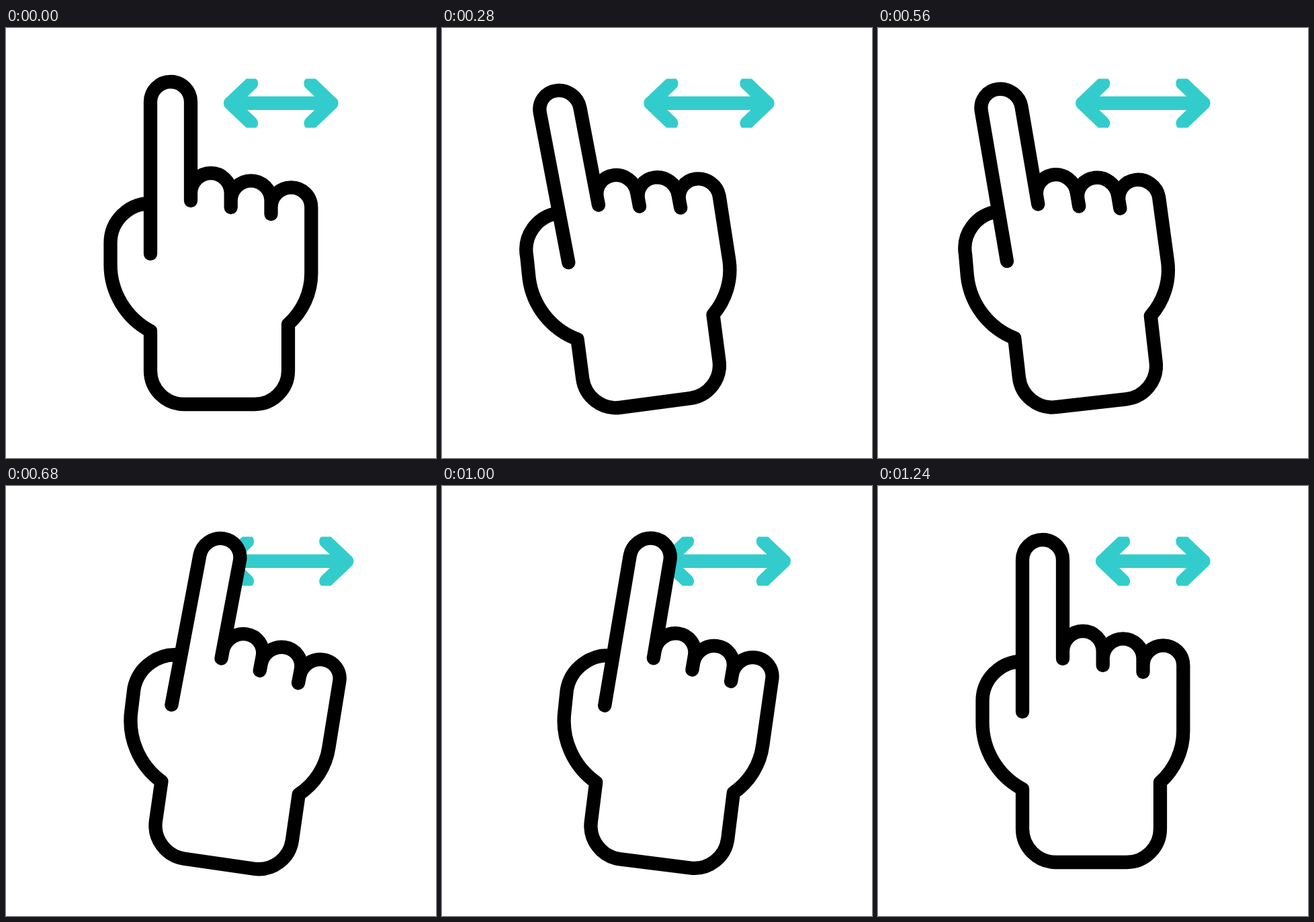
Recreate the animation shown at these times as an HTML page. Size 640x640 px, loop 1480 ms.

```html
<!DOCTYPE html>
<html lang="en">
<head>
<meta charset="utf-8">
<title>Swipe gesture</title>
<style>
  html, body { margin: 0; height: 100%; overflow: hidden; background: #fff; }
  svg { display: block; width: 100%; height: 100%; }
  path { stroke-width: 20.3; stroke-linecap: round; stroke-linejoin: round; }
</style>
</head>
<body>
<svg viewBox="0 0 640 640">
  <clipPath id="band"><rect y="75.5" width="640" height="73"/></clipPath>
  <g clip-path="url(#band)"><path id="arrow" fill="none" stroke="#33cccc"/></g>
  <path id="hand" fill="#fff" stroke="#000"/>
</svg>
<script>
const LOOP = 1480, STEP = 40;
const PIVOT = '302 560';
const LEAN_Y = 305;      // level that stays put while the fingers lean
const FINGERS_END = 340; // outline below this only rotates

const OUTLINE = `M215,336 L215,110
  C215,93.4 228.4,80 245,80 C261.6,80 275,93.4 275,110 L275,257 L275,246
  C275,229.4 288.4,216 305,216 C321.5,216 334.7,229.4 334.7,246 L334.7,267 L334.7,257
  C334.7,240.5 348,227.3 364.7,227.3 C381.2,227.3 394.5,240.5 394.5,257 L394.5,277 L394.5,267
  C394.5,250.5 407.8,237.3 424.4,237.3 C441,237.3 454.3,250.5 454.3,267 L454.3,365
  C454.3,394 441.6,421.7 420,441 L420,510
  C420,537.6 397.6,560 370,560 L265,560
  C237.4,560 215,537.6 215,510 L215,451
  C178.4,431.6 155.5,393.4 155.5,352 L155.5,320
  C155.5,287.5 182,261 215,261`;

const hand = document.getElementById('hand');
const arrow = document.getElementById('arrow');

// Eased value through [time, value] keys
function track(keys, t) {
  const i = keys.findIndex(k => t < k[0]);
  if (i < 0) return keys[keys.length - 1][1];
  if (i === 0) return keys[0][1];
  const [t0, a] = keys[i - 1], [t1, b] = keys[i];
  return a + (b - a) * (1 - Math.cos(Math.PI * (t - t0) / (t1 - t0))) / 2;
}

const TURN = [[72, 0], [453, -13.1], [775, 13.5], [1242, 0]];
const LEAN = [[72, 0], [453, -0.101], [775, 0.08], [1242, 0]];
const LEFT = [[72, 0], [453, -41.3], [755, 0]];
const RIGHT = [[565, 0], [790, 44], [1242, 0]];

function bend(lean) {
  return OUTLINE.replace(/([\d.]+),([\d.]+)/g, (_, x, y) =>
    `${+x + (y < FINGERS_END ? lean * (LEAN_Y - y) : 0)},${y}`);
}

function head(tip, back) {
  return `M${back},82.5 L${tip},112 L${back},141.5`;
}

function draw(now) {
  const t = Math.floor(now % LOOP / STEP) * STEP;
  const l = 334 + track(LEFT, t), r = 484.5 + track(RIGHT, t);
  hand.setAttribute('d', bend(track(LEAN, t)));
  hand.setAttribute('transform', `rotate(${track(TURN, t)} ${PIVOT})`);
  arrow.setAttribute('d', `${head(l, l + 31)} M${l},111.8 H${r} ${head(r, r - 31)}`);
}

const start = performance.now();
function frame() {
  draw(performance.now() - start);
  requestAnimationFrame(frame);
}
frame();
</script>
</body>
</html>
```
